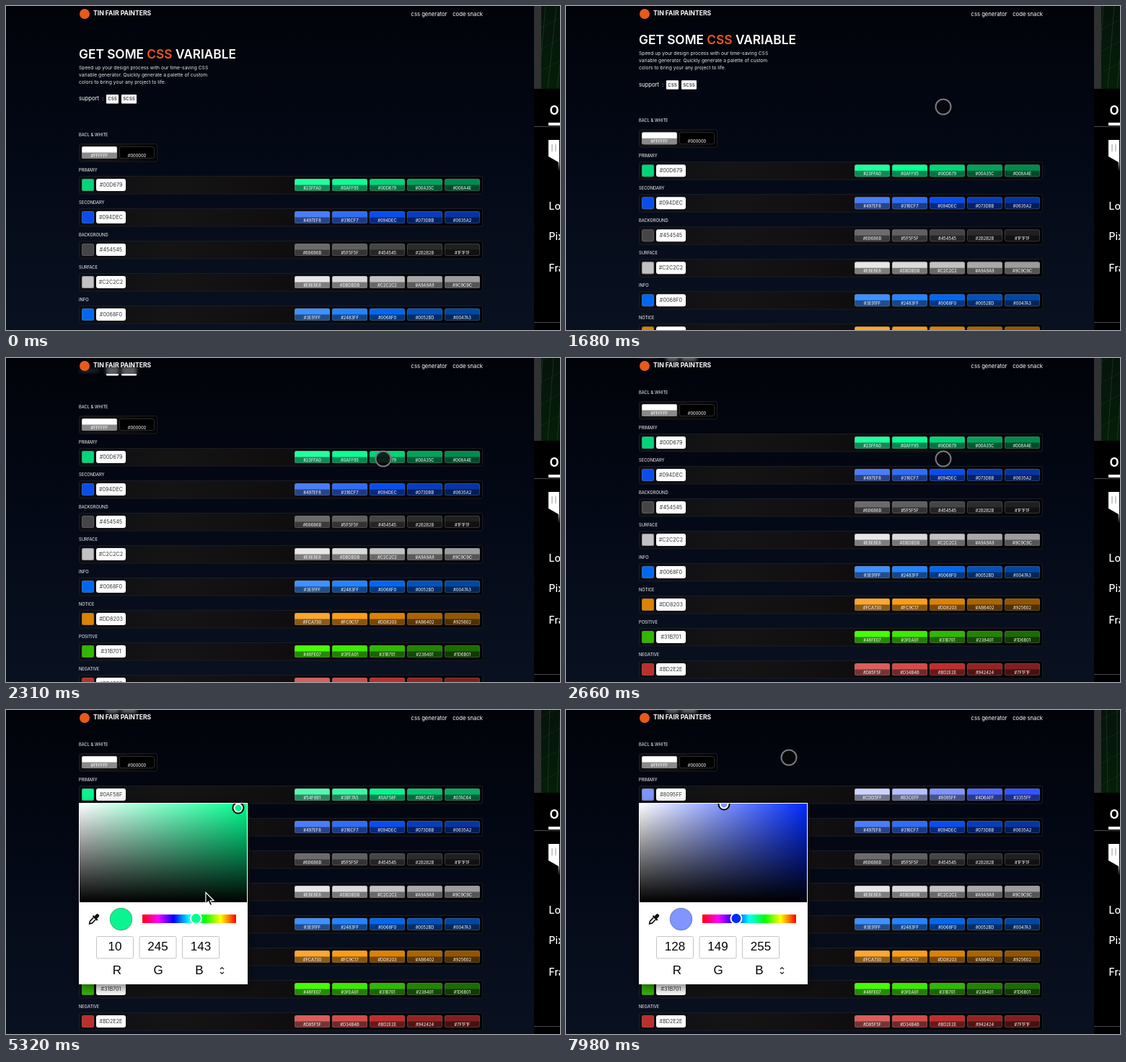
An HTML page with a canvas for the animation above (8 s loop, 768 by 450 pixels).

```html
<!DOCTYPE html>
<html lang="en">
<head>
<meta charset="utf-8">
<title>CSS variable generator</title>
<style>
  html, body { margin: 0; width: 100%; height: 100%; overflow: hidden; background: #000; }
  canvas { display: block; }
</style>
</head>
<body>
<canvas id="stage" width="768" height="450"></canvas>
<script>
const ctx = document.getElementById('stage').getContext('2d');
const LOOP = 8000;
const SANS = 'Inter, sans-serif', ARIAL = '"Liberation Sans", Arial, sans-serif';

// Keyframes are [time, ...values]; values ease between neighbouring keys.
const POINTER = [
  [100, 123, 422], [840, 523, 140], [2700, 523, 140], [3150, 87, 124], [3450, 113, 117],
  [3700, 113, 117], [4200, 194, 191], [4340, 194, 191], [4560, 222, 180], [5150, 322, 136],
  [5400, 263, 290], [5950, 236, 290], [6100, 236, 290], [6500, 256, 243], [6700, 256, 243],
  [7150, 290, 180], [7650, 219, 131], [7980, 309, 66]
];
const SATURATION_VALUE = [
  [4560, 1, .8392], [4561, .511, .623], [5150, .9592, .9608],
  [6700, .9592, .9608], [6701, .664, .138], [7150, .816, .623], [7650, .498, 1]
];
const HUE = [[5400, 153.93], [5950, 230.06]];
const SCROLL = [[910, 0], [1000, 2], [1357, 2], [2620, -131]];
const PICKER_OPEN = 3700;

const ROWS = [
  ['PRIMARY'], ['SECONDARY', '#094DEC'], ['BACKGROUND', '#454545'], ['SURFACE', '#C2C2C2'],
  ['INFO', '#0068F0'], ['NOTICE', '#DD8203'], ['POSITIVE', '#31B701'], ['NEGATIVE', '#BD2E2E']
];

const clamp = (x, lo = 0, hi = 1) => Math.min(hi, Math.max(lo, x));
const smooth = u => u * u * (3 - 2 * u);

function track(keys, t) {
  const next = keys.findIndex(k => k[0] > t);
  if (next === 0) return keys[0].slice(1);
  if (next < 0) return keys.at(-1).slice(1);
  const a = keys[next - 1], b = keys[next];
  const u = smooth((t - a[0]) / (b[0] - a[0]));
  return a.slice(1).map((v, i) => v + (b[i + 1] - v) * u);
}

function hsvToRgb(h, s, v) {
  return [5, 3, 1].map(n => {
    const k = (n + h / 60) % 6;
    return Math.round(255 * v * (1 - s * clamp(Math.min(k, 4 - k))));
  });
}

const toHex = rgb => '#' + rgb.map(c => Math.round(c).toString(16).padStart(2, '0')).join('').toUpperCase();
const fromHex = hex => [1, 3, 5].map(i => parseInt(hex.slice(i, i + 2), 16));

// Shifts HSL lightness while keeping hue and saturation.
function lighten(rgb, amount) {
  const c = rgb.map(x => x / 255), max = Math.max(...c), min = Math.min(...c);
  const l = (max + min) / 2, spread = 1 - Math.abs(2 * l - 1);
  const target = clamp(l + amount);
  const ratio = spread ? (1 - Math.abs(2 * target - 1)) / spread : 0;
  return c.map(x => 255 * clamp(target + (x - l) * ratio));
}

function text(str, x, y, size, { color = '#fff', weight = 400, align = 'left', family = SANS } = {}) {
  ctx.font = `${weight} ${size}px ${family}`;
  ctx.textAlign = align;
  ctx.textBaseline = 'middle';
  ctx.fillStyle = color;
  ctx.fillText(str, x, y);
  return ctx.measureText(str).width;
}

function box(x, y, w, h, r, fill, stroke) {
  ctx.beginPath();
  ctx.roundRect(x, y, w, h, r);
  if (fill) { ctx.fillStyle = fill; ctx.fill(); }
  if (stroke) { ctx.strokeStyle = stroke; ctx.lineWidth = 1; ctx.stroke(); }
}

function disc(x, y, r, fill, stroke, width = 2) {
  ctx.beginPath();
  ctx.arc(x, y, r, 0, 2 * Math.PI);
  if (fill) { ctx.fillStyle = fill; ctx.fill(); }
  if (stroke) { ctx.strokeStyle = stroke; ctx.lineWidth = width; ctx.stroke(); }
}

function line(points, color, width = 1) {
  ctx.beginPath();
  points.forEach(([x, y]) => ctx.lineTo(x, y));
  ctx.strokeStyle = color;
  ctx.lineWidth = width;
  ctx.stroke();
}

function gradient(x0, y0, x1, y1, ...stops) {
  const g = ctx.createLinearGradient(x0, y0, x1, y1);
  stops.forEach(([at, color]) => g.addColorStop(at, color));
  return g;
}

function clipped(x, y, w, h, draw) {
  ctx.save();
  ctx.beginPath();
  ctx.rect(x, y, w, h);
  ctx.clip();
  draw();
  ctx.restore();
}

function background() {
  ctx.fillStyle = gradient(0, 0, 0, 450, [0, '#010309'], [.5, '#040917'], [1, '#091120']);
  ctx.fillRect(0, 0, 732, 450);
}

function hero(dy) {
  let x = 101;
  for (const [part, color] of [['GET SOME ', '#fff'], ['CSS', '#e8591c'], [' VARIABLE', '#fff']])
    x += text(part, x, 68 + dy, 17.28, { color, weight: 600 });
  ['Speed up your design process with our time-saving CSS',
   'variable generator. Quickly generate a palette of custom',
   'colors to bring your any project to life.'
  ].forEach((s, i) => text(s, 101, 86 + 10 * i + dy, 6.72, { color: '#e8e8ea' }));
  text('support', 101, 129 + dy, 7.68);
  text(':', 133, 129 + dy, 7.68);
  for (const [name, left, width] of [['css', 139, 17], ['scss', 160, 21]]) {
    box(left, 123 + dy, width, 12.5, 1, '#fff');
    text(name, left + width / 2, 129 + dy, 7.68, { color: '#15171c', align: 'center' });
  }
}

function chip(x, y, hex) {
  box(x, y, 49, 17, 2.5, hex);
  box(x, y + 8.5, 49, 8.5, [0, 0, 2.5, 2.5], 'rgba(0,0,0,.46)');
  box(x + .5, y + .5, 48, 16, 2.5, null, 'rgba(120,120,120,.35)');
  text(hex, x + 24.5, y + 13, 5.76, { align: 'center' });
}

function panel(y, width) {
  const fill = gradient(101, 0, 101 + width, 0, [0, '#0c0e13'], [.22, '#151414'], [.45, '#110f10'], [1, '#020305']);
  box(101.5, y + .5, width - 1, 24.5, 2.5, fill, '#1b1d23');
}

function paletteRow(label, rgb, y) {
  if (y > 460) return;
  const hex = toHex(rgb);
  text(label, 101, y, 5.76);
  panel(y + 8, 560);
  box(105, y + 12, 17, 17, 2.5, hex);
  box(105.5, y + 12.5, 16, 16, 2.5, null, 'rgba(110,110,110,.55)');
  box(125, y + 12, 41, 17, 3, '#fff');
  text(hex, 145.5, y + 20.5, 7.2, { color: '#33353a', align: 'center' });
  [.15, .1, 0, -.1, -.15].forEach((d, i) => chip(400 + 52 * i, y + 12, toHex(lighten(rgb, d))));
}

function palettes(dy, primary) {
  text('BACL & WHITE', 101, 179 + dy, 5.76);
  panel(191 + dy, 109);
  chip(105, 195 + dy, '#FFFFFF');
  chip(157, 195 + dy, '#000000');
  ROWS.forEach(([label, hex], i) =>
    paletteRow(label, hex ? fromHex(hex) : primary, 228 + 45 * i + dy));
}

function header(dy) {
  clipped(0, 0, 732, 22, () => {
    background();
    if (dy < -30) {
      ctx.filter = 'blur(2.5px)';
      ctx.globalAlpha = .38;
      hero(dy);
    }
  });
  disc(109, 11, 7, '#e8591c');
  text('TIN FAIR PAINTERS', 121, 10.5, 8.64, { weight: 700 });
  text('css generator', 561.5, 11.5, 7.68);
  text('code snack', 661, 11.5, 7.68, { align: 'right' });
}

function sidePage(t) {
  ctx.fillStyle = '#000';
  ctx.fillRect(732, 0, 36, 450);
  ctx.fillStyle = '#303133';
  ctx.fillRect(732, 0, 10, 115);
  ctx.fillStyle = gradient(742, 0, 768, 115, [0, '#06130a'], [1, '#041f08']);
  ctx.fillRect(742, 0, 26, 115);
  clipped(742, 0, 26, 115, () => {
    const turn = t / LOOP * 14;
    for (let i = 0; i < 4; i++) {
      line([[738 + 13 * i, 115], [748 + 15 * i - turn, 0]], 'rgba(90,140,95,.28)', .8);
      line([[742, 30 * i + turn], [768, 30 * i - 14 + turn]], 'rgba(90,140,95,.16)', .8);
    }
  });
  text('O', 753.5, 145.5, 17, { weight: 700 });
  ctx.fillStyle = '#fff';
  ctx.fillRect(752, 162, 16, 4);
  ctx.fillStyle = '#4a4a4a';
  ctx.fillRect(732, 167, 36, 1);
  ctx.fillRect(732, 439, 36, 1);
  ctx.beginPath();
  [[752, 186], [767, 186], [767, 230], [766, 217], [752, 209]].forEach(p => ctx.lineTo(...p));
  ctx.fillStyle = '#fff';
  ctx.fill();
  for (const x of [757, 762]) line([[x, 192], [x, 202]], '#999');
  [['Lo', 279], ['Pix', 321], ['Fra', 365]].forEach(([s, y]) => text(s, 752.5, y, 14, { weight: 500 }));
}

function eyedropper() {
  ctx.save();
  ctx.translate(122, 290.5);
  ctx.rotate(Math.PI / 4);
  box(-2.5, -9, 5, 6.5, 2, '#111');
  box(-4.5, -3.5, 9, 2.4, 1, '#111');
  line([[-2, -1], [-2, 6], [0, 9], [2, 6], [2, -1]], '#111', 1.6);
  ctx.restore();
}

function handle(x, y, r, fill, active) {
  if (active) disc(x, y, r + 1.5, null, '#000', 3);
  disc(x, y, r, fill, '#fff', 2);
}

function picker(h, s, v, rgb, hueActive) {
  ctx.save();
  ctx.shadowColor = 'rgba(0,0,0,.55)';
  ctx.shadowBlur = 14;
  ctx.shadowOffsetY = 4;
  box(101, 129, 234, 252, 0, '#fff');
  ctx.restore();

  const pure = toHex(hsvToRgb(h, 1, 1)), color = toHex(rgb);
  clipped(102, 130, 232, 137, () => {
    ctx.fillStyle = gradient(102, 0, 334, 0, [0, '#fff'], [1, pure]);
    ctx.fillRect(102, 130, 232, 137);
    ctx.fillStyle = gradient(0, 130, 0, 267, [0, 'rgba(0,0,0,0)'], [1, '#000']);
    ctx.fillRect(102, 130, 232, 137);
    handle(108 + 223 * s, 131 + 130 * (1 - v), 5.5, color, !hueActive);
  });

  eyedropper();
  disc(159.5, 290.5, 15.5, color, 'rgba(0,0,0,.25)', 1);
  const rainbow = ['#f00', '#f0f', '#00f', '#0ff', '#0f0', '#ff0', '#f00'].map((c, i) => [i / 6, c]);
  box(189, 284, 130, 12, 1, gradient(189, 0, 319, 0, ...rainbow));
  handle(189 + 130 * (1 - h / 360), 289.5, 7.5, pure, hueActive);

  const center = { color: '#000', align: 'center', family: ARIAL };
  rgb.forEach((value, i) => {
    const x = 125.5 + 59.5 * i;
    box(x, 314.5, 51, 30.5, 2, '#fff', '#c4c4c4');
    text(value, x + 25.5, 329.5, 17, center);
    text('RGB'[i], 154 + 57 * i, 362, 17, center);
  });
  line([[297, 360], [299.5, 357.5], [302, 360]], '#222', 1.2);
  line([[297, 364], [299.5, 366.5], [302, 364]], '#222', 1.2);
}

function arrow(x, y) {
  ctx.beginPath();
  [[0, 0], [0, 15.5], [3.6, 12.3], [6.2, 18], [8.8, 16.9], [6.3, 11.3], [11, 11.2]]
    .forEach(([dx, dy]) => ctx.lineTo(x + dx, y + dy));
  ctx.closePath();
  ctx.fillStyle = '#000';
  ctx.fill();
  ctx.strokeStyle = '#fff';
  ctx.lineWidth = 1.2;
  ctx.stroke();
}

function draw(t) {
  const [dy] = track(SCROLL, t), [h] = track(HUE, t);
  const [s, v] = track(SATURATION_VALUE, t), [px, py] = track(POINTER, t);
  const rgb = hsvToRgb(h, s, v), open = t >= PICKER_OPEN;

  background();
  hero(dy);
  palettes(dy, rgb);
  header(dy);
  sidePage(t);
  if (open) picker(h, s, v, rgb, t >= 5400 && t < 6700);

  const overPicker = open && px > 101 && px < 335 && py > 129 && py < 381;
  if (overPicker) arrow(px, py);
  else if (t >= 100) disc(px, py, 10.5, 'rgba(8,8,10,.85)', '#77797c', 2);
}

const start = performance.now();
function tick() {
  draw((performance.now() - start) % LOOP);
  requestAnimationFrame(tick);
}
tick();
</script>
</body>
</html>
```
